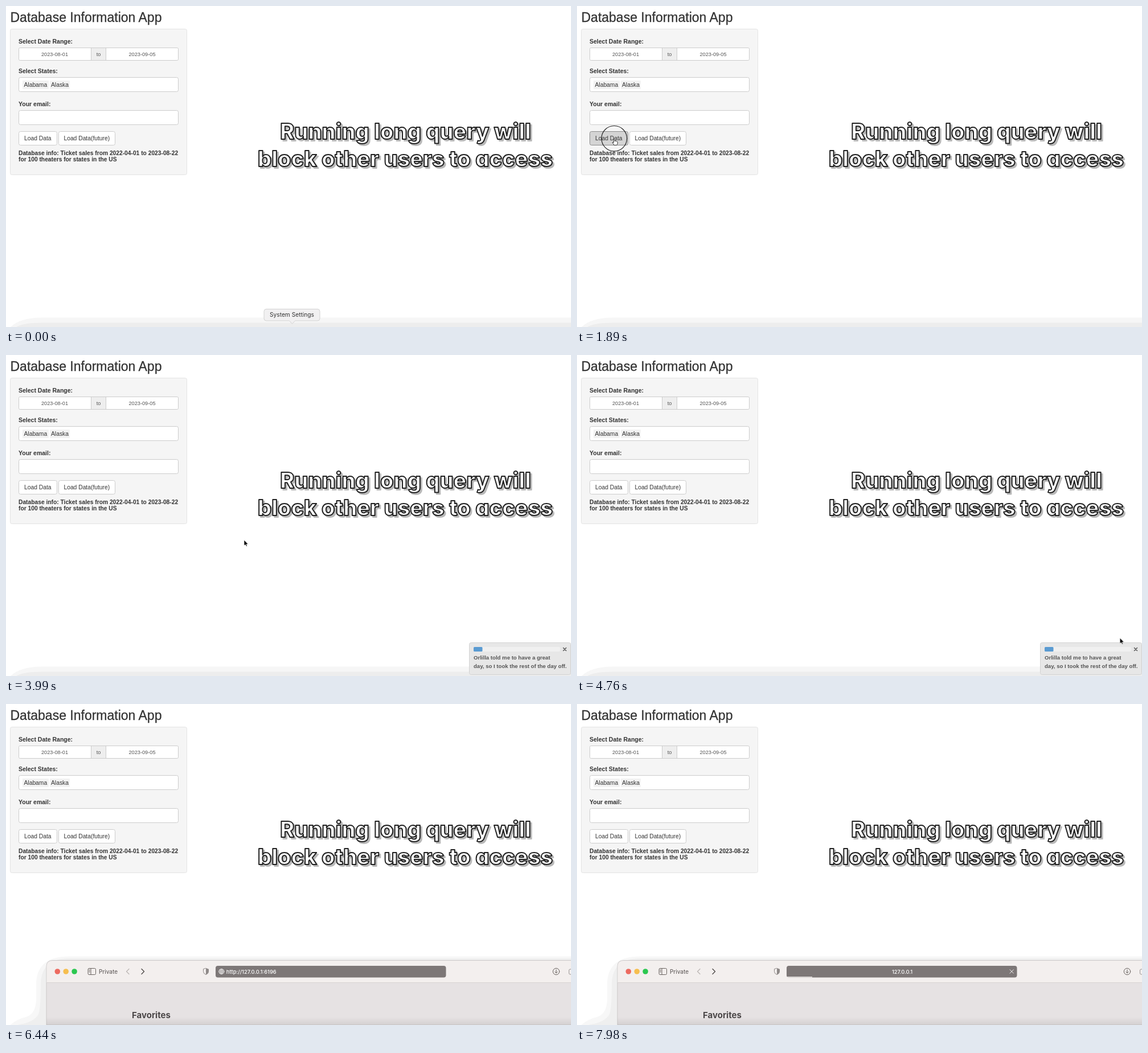
These frames come from a looping animation (992x564 px, 8000 ms). An HTML page:

```html
<!DOCTYPE html>
<html lang="en">
<head>
<meta charset="utf-8">
<title>Database Information App</title>
<style>
html, body { margin: 0; width: 100%; height: 100%; overflow: hidden; background: #fff; }
svg { display: block; width: 992px; height: 564px; }
text { font: 10.3px "Liberation Sans", Arial, sans-serif; fill: #333; white-space: pre; }
.title { font-size: 23px; stroke: #333; stroke-width: .3px; }
.label { font-size: 10.5px; font-weight: 700; }
.info { font-size: 10.25px; font-weight: 700; }
.date { font-size: 9.2px; fill: #555; text-anchor: middle; }
.mid { text-anchor: middle; }
.field { fill: #fff; stroke: #ccc; }
.ui { font: 500 9.3px Inter, sans-serif; }
.light { fill: #fff; }
.head text {
  font: 800 38px Inter, sans-serif; font-feature-settings: "cv11";
  text-anchor: middle; stroke-width: 2px; stroke-linejoin: round;
}
.head .back { fill: #b9b9b9; stroke: #b9b9b9; }
.head .front { fill: #fff; stroke: #222; }
.note { font-size: 9.6px; font-weight: 700; fill: #555; }
.line { fill: none; stroke-linecap: round; stroke-linejoin: round; }

/* One 8 s timeline; hard switches use step-end */
.cut { animation: 8s step-end infinite; }
.fade { animation: 8s linear infinite; }

.tip { animation-name: tip; }
@keyframes tip { 0% { opacity: 1 } 1.75%, to { opacity: 0 } }

.press { animation-name: press; }
@keyframes press {
  0% { fill: #fff; stroke: #ccc }
  21% { fill: #e6e6e6; stroke: #adadad }
  22.75% { fill: #d4d4d4; stroke: #8c8c8c }
  24.5% { fill: #e6e6e6; stroke: #999 }
  46.4%, to { fill: #fff; stroke: #ccc }
}
.ring { animation-name: ring; }
@keyframes ring { 0%, 24.5%, to { opacity: 0 } 22.75% { opacity: 1 } }

.toast { animation-name: toast; }
@keyframes toast { 0% { opacity: 0 } 49.875% { opacity: 1 } 65.625%, to { opacity: 0 } }

.browser { animation-name: browser; }
@keyframes browser { 0% { opacity: 0 } 65.625%, to { opacity: 1 } }

.pointer { animation: move 8s ease-in-out infinite; }
@keyframes move {
  0%, .8% { transform: translate(502px, 566px); animation-timing-function: ease-in }
  11.375% { transform: translate(300px, 294px); animation-timing-function: linear }
  15.625% { transform: translate(214px, 180px); animation-timing-function: ease-out }
  21%, 45.6% { transform: translate(66px, 233px) }
  55.125%, 56.6% { transform: translate(915px, 455px); animation-timing-function: ease-in }
  59.5% { transform: translate(953px, 497px); animation-timing-function: ease-out }
  63%, to { transform: translate(984px, 515px) }
}
.arrow { animation-name: arrow; }
@keyframes arrow { 0%, 46.4% { opacity: 1 } 21%, 65.625%, to { opacity: 0 } }
.hand { animation-name: hand; }
@keyframes hand { 0%, 46.4%, to { opacity: 0 } 21% { opacity: 1 } }

.url { animation-name: url; }
@keyframes url { 0%, 85.75% { opacity: 1 } 87%, to { opacity: 0 } }
.globe { animation-name: globe; }
@keyframes globe { 0%, 88.5% { opacity: 1 } 91%, to { opacity: 0 } }
.host { animation-name: host; }
@keyframes host { 0%, 89% { opacity: 0 } 93.5%, to { opacity: 1 } }
.stop { animation-name: stop; }
@keyframes stop { 0% { opacity: 0 } 85.75%, to { opacity: 1 } }
.load { animation-name: load; transform-origin: 368px 0; }
@keyframes load { 0%, 85.75% { transform: scaleX(0) } 87.4%, to { transform: scaleX(1) } }
</style>
</head>
<body>
<svg viewBox="0 0 992 564" width="992" height="564">
  <defs>
    <linearGradient id="floor" x2="0" y2="1">
      <stop offset="0" stop-opacity="0"/>
      <stop offset="1" stop-opacity=".08"/>
    </linearGradient>
    <clipPath id="bar"><rect x="368" y="460" width="404.500" height="20.500" rx="4"/></clipPath>
  </defs>
  <rect width="992" height="564" fill="#fff"/>

  <!-- form -->
  <text class="title" x="7.500" y="28">Database Information App</text>
  <rect x="7.500" y="40.500" width="310" height="256" rx="3" fill="#f5f5f5" stroke="#e3e3e3"/>
  <text class="label" x="22" y="66">Select Date Range:</text>
  <rect class="field" x="22.500" y="73.500" width="280" height="22" rx="2"/>
  <rect x="149.500" y="73.500" width="26" height="22" fill="#eee" stroke="#ccc"/>
  <text class="date" x="85.500" y="87.500">2023-08-01</text>
  <text class="date" x="162.500" y="87.500">to</text>
  <text class="date" x="239" y="87.500">2023-09-05</text>

  <text class="label" x="22" y="118">Select States:</text>
  <rect class="field" x="22.500" y="125.500" width="280" height="25" rx="3"/>
  <path d="M29 131h46v15h-46zM77 131h35v15h-35z" fill="#f2f2f2"/>
  <text x="31.500" y="141.600">Alabama</text>
  <text x="79" y="141.600">Alaska</text>

  <text class="label" x="22" y="176">Your email:</text>
  <rect class="field" x="22.500" y="183.500" width="280" height="25" rx="3"/>

  <rect class="cut press" x="22.500" y="220.500" width="67" height="24" rx="3" fill="#fff" stroke="#ccc"/>
  <rect class="field" x="92.500" y="220.500" width="99" height="24" rx="3"/>
  <text class="mid" x="55.800" y="236.200">Load Data</text>
  <text class="mid" x="141.800" y="236.200">Load Data(future)</text>
  <text class="info" x="22" y="262">Database info: Ticket sales from 2022-04-01 to 2023-08-22</text>
  <text class="info" x="22" y="273">for 100 theaters for states in the US</text>

  <!-- headline -->
  <g class="head">
    <g transform="translate(3 3)">
      <text class="back" x="701.500" y="234">Running long query will</text>
      <text class="back" x="701" y="282">block other users to access</text>
    </g>
    <text class="front" x="701.500" y="234">Running long query will</text>
    <text class="front" x="701" y="282">block other users to access</text>
  </g>

  <!-- shade along the bottom -->
  <path d="M8 564Q24 548 62 547.500H992V564Z" fill="#f6f6f6"/>
  <path d="M18 564Q30 556.500 62 556.500H992V564Z" fill="#ededed"/>

  <g class="cut tip">
    <path d="M457 532.500H547Q551 532.500 551 536.500V549Q551 553 547 553H507.500L502.500 558.500L497.500 553H457Q453 553 453 549V536.500Q453 532.500 457 532.500Z" fill="#f1f0f1" stroke="#d2d2d2"/>
    <text class="ui mid" x="502" y="546.200" style="font-size:10.2px;font-weight:400">System Settings</text>
  </g>

  <!-- progress notification -->
  <g class="cut toast" opacity="0">
    <rect x="813.500" y="505.500" width="178" height="56" rx="3" fill="#e7e7e7" stroke="#d2d2d2"/>
    <rect x="821" y="513" width="152" height="8" rx="2" fill="#f0f0f0"/>
    <rect x="821" y="513" width="15.500" height="8" rx="1.500" fill="#5a9bd2"/>
    <path class="line" d="M978.500 514.500l5 5m0-5l-5 5" stroke="#555" stroke-width="1.500"/>
    <text class="note" x="821" y="535.300">Orlilla told me to have a great</text>
    <text class="note" x="821" y="550">day, so I took the rest of the day off.</text>
  </g>

  <!-- browser window -->
  <g class="cut browser" opacity="0">
    <path d="M8 564Q20 553 35 550Q52 545 53 520V490Q55 443.500 110 443.500H992V564Z" fill="#f7f7f7"/>
    <path d="M20 564Q50 559 57 545Q61 535 61 490Q63 447 110 447H992V564Z" fill="#efefef"/>
    <path d="M71 564V461Q71 450.500 82 450.500H993V564Z" fill="#e6e2e3" stroke="#cbc8c8"/>
    <path d="M71.500 489V461Q71.500 451 82 451H992V489Z" fill="#f3efee"/>
    <path d="M71 489.500H992" stroke="#d8d3d3"/>
    <circle cx="90.300" cy="470" r="4.800" fill="#ed6a60"/>
    <circle cx="105.200" cy="470" r="4.800" fill="#f6be4f"/>
    <circle cx="120.100" cy="470" r="4.800" fill="#2bc750"/>
    <g class="line" stroke="#68625f">
      <rect x="144" y="464.500" width="13.500" height="11" rx="2"/>
      <path d="M149 464.500v11M145.800 467h1.400m-1.400 2h1.400m-1.400 2h1.400"/>
      <path d="M216 465.500l-4.500 4.500l4.500 4.500" stroke="#bbb6b5" stroke-width="1.300"/>
      <path d="M238 465.500l4.500 4.500l-4.500 4.500" stroke="#4e4a49" stroke-width="1.400"/>
      <path d="M351 464.500l4.500 1.500v4.500q0 3-4.500 5q-4.500-2-4.500-5v-4.500z" stroke="#8e8988"/>
      <circle cx="966" cy="470" r="5.700"/>
      <path d="M966 466.800v6m-2.300-2.300l2.300 2.300l2.300-2.300"/>
      <path d="M993 466h-2.500q-2 0-2 2v5q0 2 2 2h2.500" stroke="#9a9594"/>
    </g>
    <path d="M351 464.500l4.500 1.500v4.500q0 3-4.500 5z" fill="#8e8988"/>
    <text class="ui" x="163" y="473.500" style="font-size:9.9px;fill:#6a6564">Private</text>

    <g clip-path="url(#bar)">
      <rect x="368" y="460" width="405" height="21" fill="#7d7777"/>
      <rect class="fade load" x="368" y="479" width="45" height="2" fill="#e9e5e4"/>
    </g>
    <g class="fade globe line" stroke="#f2f0f0" stroke-width=".8">
      <circle cx="378.300" cy="470" r="4.600"/>
      <ellipse cx="378.300" cy="470" rx="2.100" ry="4.600"/>
      <path d="M373.700 470h9.200M378.300 465.400v9.200M374.500 467.600h7.600m-7.600 4.800h7.600"/>
    </g>
    <text class="ui light fade url" x="386.800" y="473.500">http://127.0.0.1:6196</text>
    <text class="ui light mid fade host" x="571" y="473.500">127.0.0.1</text>
    <path class="line cut stop" d="M760 466.700l6.500 6.500m0-6.500l-6.500 6.500" stroke="#f2f0f0"/>
    <text class="ui" x="221" y="552" style="font-size:15px;font-weight:700;fill:#4b4748">Favorites</text>
    <rect x="71" y="550" width="921" height="14" fill="url(#floor)"/>
  </g>

  <!-- pointer -->
  <circle class="cut ring line" cx="65.300" cy="232.800" r="22.300" stroke="#222" stroke-width="1.200" opacity="0"/>
  <g class="pointer">
    <path class="cut arrow" d="M0 0V10L2.300 8L3.900 11.300L5.500 10.500L4 7.500H7.200Z" fill="#000" stroke="#fff" stroke-width=".7"/>
    <path class="cut hand" d="M-1.500 0.500Q-.5-.8 .5 .5V4.500Q1.500 3.500 2.300 4.700Q3.300 4 3.900 5.200Q5.300 5 5.300 6.500Q5.300 10 3.700 11.500H-1Q-1.500 9.500-4 7Q-4 5.300-1.500 7Z" fill="#fff" stroke="#222" stroke-width=".9" stroke-linejoin="round"/>
  </g>
</svg>
</body>
</html>
```
